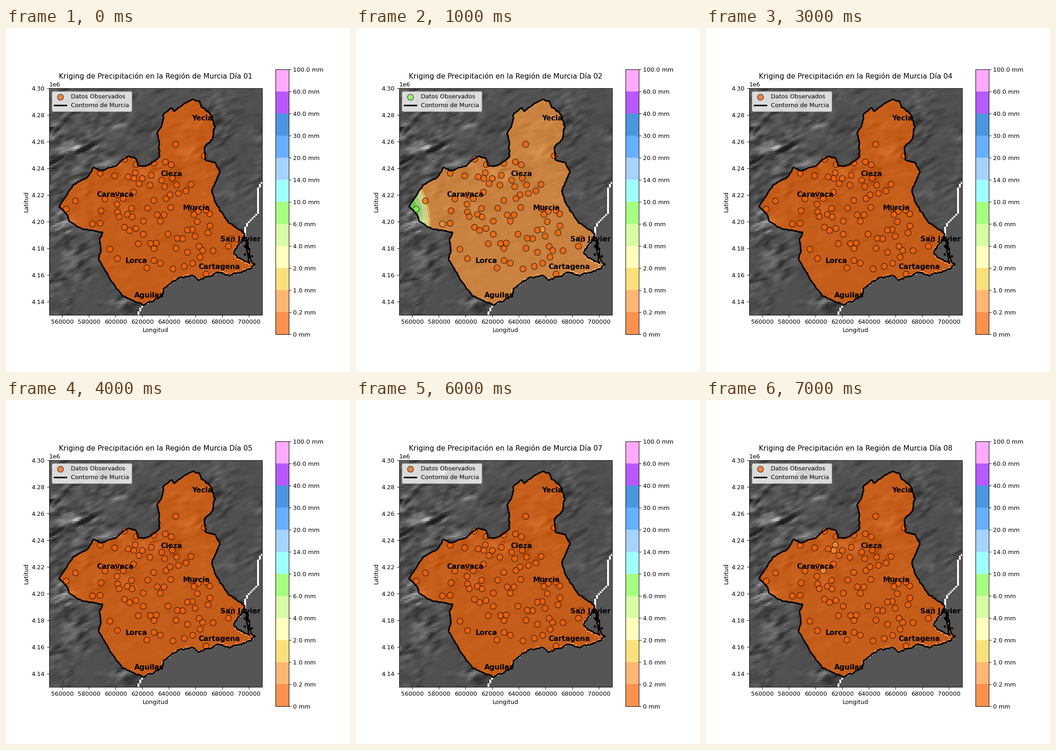
Write a matplotlib script that moves like this. It is 748 by 748 pixels and loops after 8 s.

```python
import matplotlib.pyplot as plt
import numpy as np
from matplotlib.animation import FuncAnimation
from matplotlib.cm import ScalarMappable
from matplotlib.colors import BoundaryNorm, ListedColormap
from matplotlib.path import Path

SIDE, DPI = 748, 93.5
X0, X1, Y0, Y1 = 550000, 710000, 4.13e6, 4.30e6
LEFT, TOP, SCALE = 93.5, 131.37, 345.0  # axes corner in pixels, metres per pixel
ALPHA = 0.7
plt.rcParams["font.size"] = 9.93

LEVELS = [0, 0.2, 1, 2, 4, 6, 10, 14, 20, 30, 40, 60, 100]
COLORS = ["#f86305", "#ff983b", "#f8d445", "#ffffa2", "#c7fb7e", "#80ff4a",
          "#77ffff", "#80bfff", "#278eff", "#0269d4", "#9a13ff", "#ff86ff"]
cmap = ListedColormap(COLORS)
norm = BoundaryNorm(LEVELS, len(COLORS))

# Corners of the regional border, clockwise from the western tip
CORNERS = [
    (115, 389), (147, 340), (178, 324), (190, 303), (205, 311), (240, 299),
    (266, 278), (283, 285), (287, 300), (310, 299), (334, 280), (333, 245),
    (328, 228), (339, 213), (343, 187), (360, 173), (366, 182), (389, 163),
    (406, 155), (421, 161), (426, 172), (447, 189), (453, 214), (449, 243),
    (431, 258), (434, 287), (455, 293), (465, 312), (447, 354), (455, 379),
    (482, 421), (520, 448), (512, 464), (495, 487), (505, 500), (529, 513),
    (521, 462), (526, 466), (532, 509), (541, 514), (525, 526), (481, 540),
    (465, 530), (434, 542), (418, 548), (408, 537), (372, 545), (341, 569),
    (337, 584), (300, 602), (254, 583), (228, 548), (201, 503), (206, 488),
    (204, 460), (210, 444), (165, 437), (138, 421), (132, 404)]
SEA = [(560, 334), (549, 352), (549, 402), (524, 426), (522, 448), (470, 500),
       (345, 555), (299, 602), (283, 630), (560, 630)]
CITIES = [("Yecla", 427, 201), ("Cieza", 359.5, 322), ("Caravaca", 237, 367),
          ("Murcia", 414, 396), ("Lorca", 283.5, 511), ("Cartagena", 464, 524),
          ("San Javier", 510, 464), ("Aguilas", 311, 586)]

# Observed rain in mm at the wet stations of each day
RAIN = {2: {(131, 394): 8, (188, 426): 0.5, (405, 438): 0.5},
        3: {(205, 316): 0.5},
        6: {(258, 285): 8, (205, 316): 1.5, (369, 253): 0.5},
        8: {(281, 315): 0.5, (278, 327): 0.5, (255, 371): 0.5}}
DRY = 1


def to_map(points):
    p = np.asarray(points, float)
    return np.column_stack([X0 + (p[:, 0] - LEFT) * SCALE,
                            Y1 - (p[:, 1] - TOP) * SCALE])


def blur(values, width):
    """Moving average along a closed line."""
    half = width // 2
    return sum(np.roll(values, k, axis=0) for k in range(-half, half + 1)) / width


def make_border():
    """Walk from corner to corner in 1 px steps; the coast is rougher."""
    ends = CORNERS[1:] + CORNERS[:1]
    line = np.vstack([np.linspace(a, b, int(np.hypot(b[0] - a[0], b[1] - a[1])) + 1,
                                  endpoint=False) for a, b in zip(CORNERS, ends)])
    shake = blur(np.random.default_rng(4).normal(size=line.shape), 5)
    coast = line[:, 1] + 0.7 * line[:, 0] > 790
    line = blur(line + shake * np.where(coast, 2.4, 1.4)[:, None], 5)
    return np.vstack([line, line[:1]])


def make_stations(border, total=86, gap=10):
    """Wet stations first, then random ones kept apart, denser in the middle."""
    rng = np.random.default_rng(21)
    inside = Path(border)
    found = list(dict.fromkeys(s for day in RAIN.values() for s in day))
    while len(found) < total:
        x, y = rng.normal((350, 405), (105, 75))
        apart = min(np.hypot(x - a, y - b) for a, b in found) > gap
        if apart and inside.contains_point((x, y)):
            found.append((x, y))
    return found


def relief(border):
    """Grey hill shading with flat sea and white cells along the shore."""
    cols, rows = 116, 123
    gx, gy = np.meshgrid(LEFT + 4 * (np.arange(cols) + 0.5),
                         TOP + 4 * (np.arange(rows) + 0.5))
    rng = np.random.default_rng(11)
    fy, fx = np.meshgrid(np.fft.fftfreq(rows), np.fft.fftfreq(cols), indexing="ij")
    tilt = np.radians(-27)
    along = fx * np.cos(tilt) + fy * np.sin(tilt)
    across = fy * np.cos(tilt) - fx * np.sin(tilt)

    def noise(length, width):
        spectrum = np.fft.fft2(rng.normal(size=(rows, cols)))
        keep = np.exp(-(along * length) ** 2 - (across * width) ** 2)
        out = np.fft.ifft2(spectrum * keep).real
        return out / out.std()

    def bump(cx, cy, wx, wy):
        return np.exp(-((gx - cx) / wx) ** 2 - ((gy - cy) / wy) ** 2)

    amp = 0.025 + 0.06 * bump(150, 240, 110, 90) + 0.04 * bump(130, 500, 80, 90)
    amp += 0.025 * bump(280, 300, 160, 150)
    amp *= np.exp(0.5 * noise(20, 14) - 0.15)
    hills = 0.75 * noise(7, 2.4) + 0.5 * noise(14, 5)
    shade = (0.315 + amp * hills).clip(0.13, 0.75)

    cells = np.column_stack([gx.ravel(), gy.ravel()])
    sea = Path(SEA).contains_points(cells) & ~Path(border).contains_points(cells)
    sea = sea.reshape(rows, cols)
    pad = np.pad(sea, 1, mode="edge")
    near = pad[:-2, 1:-1] | pad[2:, 1:-1] | pad[1:-1, :-2] | pad[1:-1, 2:]
    shade[sea] = 0.333
    shade[near & ~sea] = 1
    return shade


def storm(t):
    """Rain in mm: 9 at the centre, 1 at the rim (t = 1), light rain beyond."""
    return np.maximum(0.5, 9 - 8 * t ** 1.1)


def rain_field(day, x, y):
    """Estimated rain in mm over the map, in pixel coordinates."""
    if day == 2:
        return storm(np.hypot(x - 0.2 * (y - 394) - 120, 0.5 * (y - 394)) / 38)
    if day == 6:
        west = storm(np.hypot((x - 258) * np.where(x < 258, 0.32, 1.05), y - 282) / 52)
        pale = 357 - 0.42 * (y - 178)
        rim = 404 - 0.614 * (y - 156)
        north = np.clip(2 - (x - pale) / (rim - pale), 0.5, 2.9)
        return np.where((y < 285) & (x > 322), north, west)
    spots = {3: [(205, 316, 42)], 8: [(280, 321, 46), (255, 371, 26)]}
    rain = np.full_like(x, 0.01)
    for cx, cy, r in spots.get(day, []):
        rain = np.maximum(rain, 0.19 * (1 - np.hypot(x - cx, y - cy) / r))
    return rain


fig = plt.figure(figsize=(SIDE / DPI, SIDE / DPI), dpi=DPI, facecolor="white")
ax = fig.add_subplot()
border_px = make_border()
border = to_map(border_px)
region = Path(border)
stations = make_stations(border_px)

ax.imshow(relief(border_px), cmap="gray", vmin=0, vmax=1, interpolation="nearest",
          extent=(X0, X1, Y0, Y1), zorder=0)

px, py = np.meshgrid(np.arange(92, 560, 1.0), np.arange(130, 627, 1.0))
mx, my = X0 + (px - LEFT) * SCALE, Y1 - (py - TOP) * SCALE


def rain_layer(day):
    field = rain_field(day, px, py)
    layer = [ax.contourf(mx, my, field, levels=LEVELS, cmap=cmap, norm=norm,
                         alpha=ALPHA, zorder=0.5)]
    if day != DRY:
        wet = field.max() > 1
        steps = np.arange(1, 9) if wet else np.linspace(0.02, 0.18, 7)
        layer.append(ax.contour(mx, my, field, levels=steps, alpha=0.3,
                                colors="white" if wet else "#ff7a20",
                                linewidths=0.6, zorder=0.6))
    for part in layer:
        part.set_clip_path(region, transform=ax.transData)
    return layer


layers = {day: rain_layer(day) for day in (DRY, *RAIN)}

dots = ax.scatter(*to_map(stations).T, s=100, c=[COLORS[0]] * len(stations),
                  edgecolors="black", linewidths=1, alpha=ALPHA, zorder=1,
                  label="Datos Observados")
ax.plot(*border.T, color="black", lw=2.5, zorder=2, label="Contorno de Murcia")
islands = np.random.default_rng(2).normal((521, 483), (7, 11), (7, 2))
ax.plot(*to_map(islands).T, "o", color="black", ms=3.2, zorder=2)

for name, x, y in CITIES:
    (cx, cy), = to_map([(x, y)])
    ax.text(cx, cy, name, fontsize="large", fontweight="bold", ha="center")

ax.set_xlim(X0, X1)
ax.set_ylim(Y0, Y1)
ax.set_aspect("equal")
ax.set_xlabel("Longitud")
ax.set_ylabel("Latitud")
legend = ax.legend(loc="upper left")
title = ax.set_title("")

bar = fig.colorbar(ScalarMappable(norm, cmap), ax=ax, alpha=ALPHA, spacing="uniform")
bar.set_ticks(LEVELS, labels=["0 mm"] + [f"{v:.1f} mm" for v in LEVELS[1:]])
bar.minorticks_off()


def draw(i):
    day = i + 1
    shown = day if day in layers else DRY
    for key, layer in layers.items():
        for part in layer:
            part.set_visible(key == shown)
    rain = RAIN.get(day, {})
    faces = cmap(norm([rain.get(s, 0) for s in stations]))
    faces[:, 3] = ALPHA
    dots.set_facecolor(faces)
    legend.legend_handles[0].set_facecolor(faces[0])
    title.set_text(f"Kriging de Precipitación en la Región de Murcia Día {day:02d}")
    return []


anim = FuncAnimation(fig, draw, frames=8, interval=1000, repeat=True,
                     repeat_delay=0, blit=False)
plt.show()
```
